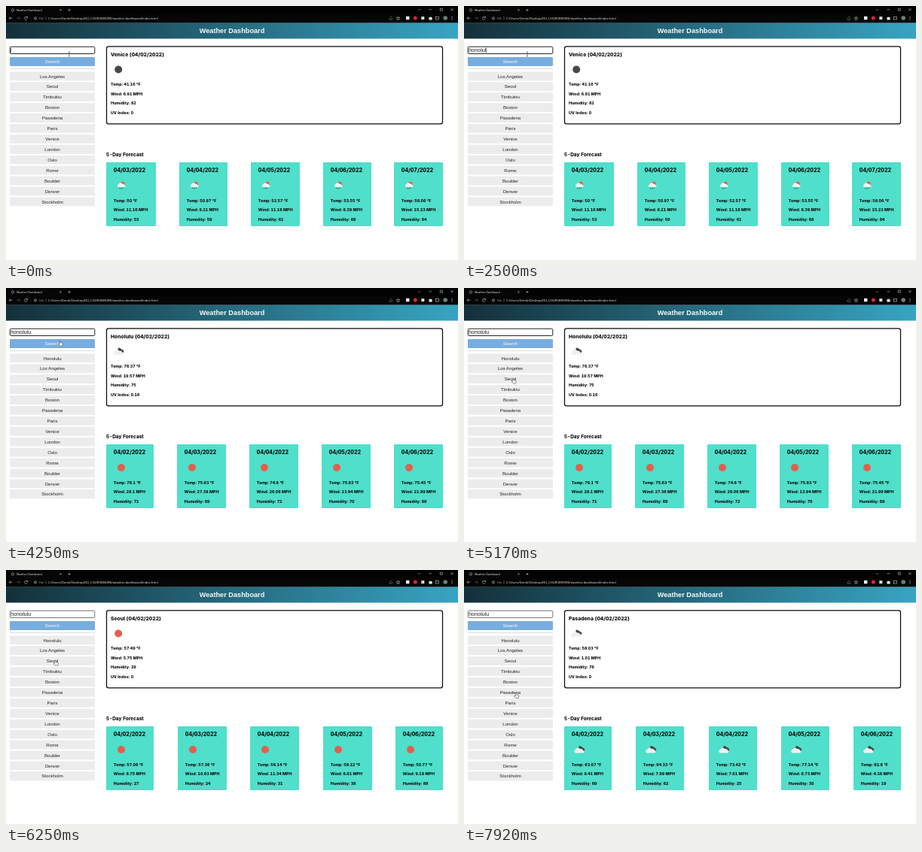
Recreate the animation shown at these times as an HTML page. Size 600x338 px, loop 8 s.

```html
<!DOCTYPE html>
<html lang="en">
<head>
<meta charset="utf-8">
<title>Weather Dashboard</title>
<style>
  html, body { margin: 0; width: 100%; height: 100%; overflow: hidden; background: #fff; }
  svg { display: block; width: 100%; height: 100%; }
  text { white-space: pre; }
  .arial { font-family: "Liberation Sans", Arial, sans-serif; }
  .bold { font-family: Inter, sans-serif; font-weight: 800; font-feature-settings: "tnum"; }
  .chrome { font-family: "Open Sans", sans-serif; }
</style>
</head>
<body>
<svg id="stage" viewBox="0 0 600 338">
  <defs>
    <linearGradient id="banner">
      <stop offset="0" stop-color="#14303a"/>
      <stop offset="1" stop-color="#38a4c2"/>
    </linearGradient>
    <g id="sun"><circle r="5" fill="#e35f4c"/></g>
    <g id="moon"><circle r="5" fill="#484848"/></g>
    <g id="clouds">
      <path d="M1 -2.9L5.3 -.2" stroke="#454545" stroke-width="3.8" stroke-linecap="round"/>
      <path d="M-5 4.4a2.3 2.3 0 0 1-.1-4.5a3.8 3.8 0 0 1 6.6-.6a2.7 2.7 0 0 1 3.7 2a1.6 1.6 0 0 1-.2 3.1z" fill="#f0f0f0"/>
    </g>
    <g id="rain">
      <circle cx="1.8" cy="-2.2" r="3" fill="#e35f4c"/>
      <path d="M-3.6 2a1.9 1.9 0 0 1 0-3.7a2.8 2.8 0 0 1 5.2-.5a2.1 2.1 0 0 1 2.7 1.6a1.3 1.3 0 0 1 0 2.6z" fill="#f2f2f2"/>
      <path d="M-2 2.6l-.8 1.5M.4 2.6l-.9 2.2M2.6 2.6l-.8 1.5" stroke="#484848" stroke-width=".8"/>
    </g>
  </defs>

  <rect width="600" height="338" fill="#fff"/>
  <g class="chrome" fill="#f2f2f2">
    <rect width="600" height="22.5" fill="#020202"/>
    <path d="M2 11V3a2 2 0 0 1 2-2H76a2 2 0 0 1 2 2v8H600v11.5H0V11z" fill="#060606"/>
    <text x="14" y="6.8" font-size="3.6">Weather Dashboard</text>
    <text x="44" y="17.6" font-size="3.9" fill="#aaa">File</text>
    <text x="56" y="17.6" font-size="4.15">C:/Users/Derek/Desktop/DU_COURSEWORK/weather-dashboard/index.html</text>
    <g fill="none" stroke="#ccc" stroke-width=".6">
      <circle cx="9" cy="5.5" r="1.7"/>
      <path d="M71.2 4.2l2.4 2.4m0-2.4l-2.4 2.4M82.3 5.4h3.4M84 3.7v3.4"/>
      <path d="M8.3 16.2H4.2m1.8-1.8l-1.8 1.8l1.8 1.8"/>
      <path d="M14.3 16.2h4.1m-1.8-1.8l1.8 1.8l-1.8 1.8" stroke="#666"/>
      <path d="M28.2 15.2a2 2 0 1 0 .1 1.8M28.5 13.8v1.7h-1.7"/>
      <circle cx="39" cy="16.3" r="1.6"/>
      <path d="M39 16v1.2M53 14.3v4" stroke="#888"/>
      <path d="M509 16v2h3.5v-2M510 16.2c0-1.5 1-2 2.5-2" stroke="#888"/>
      <path d="M520.5 14l.7 1.5 1.6.2-1.2 1.1.3 1.6-1.4-.8-1.4.8.3-1.6-1.2-1.1 1.6-.2z"/>
      <path d="M547.3 4.3l1.3 1.3l1.3-1.3M561.6 4.8h3.4M576.3 3.2h3v3h-3zM590.6 3.3l3 3m0-3l-3 3"/>
      <rect x="570.6" y="14.2" width="3.8" height="3.8"/>
    </g>
    <rect x="531" y="13.8" width="4.4" height="4.4"/>
    <circle cx="543.3" cy="16" r="2.5" fill="#e2203f"/>
    <rect x="551.3" y="14.1" width="4" height="4" fill="#ddd"/>
    <path d="M561.5 15h1.2a.9.9 0 0 1 1.7 0h1v1.1a.8.8 0 0 1 0 1.5v.9h-3.9z"/>
    <circle cx="583.2" cy="16" r="2.8" fill="#6f8178"/>
    <path d="M592 14v.9m0 .8v.9m0 .8v.9" stroke="#ddd" stroke-width=".9"/>
  </g>
  <rect y="22.5" width="600" height="21" fill="url(#banner)"/>
  <text class="arial" x="300" y="36.3" font-size="9.2" font-weight="700" text-anchor="middle" fill="#f6fafb">Weather Dashboard</text>

  <rect id="field" x="5.3" y="54.2" width="112.5" height="9.3" rx="1.4" fill="#fff"/>
  <text id="query" class="arial" x="6.2" y="61.2" font-size="7.2" fill="#222"></text>
  <rect id="caret" y="55.6" width=".6" height="6.8" fill="#111"/>
  <rect x="5" y="68" width="113" height="12" rx="1.2" fill="#78addf"/>
  <text class="arial" x="61.5" y="76.1" font-size="6.1" text-anchor="middle" fill="#fff">Search</text>
  <path d="M5 83.6H118" stroke="#c4c4c4" stroke-width=".6"/>

  <rect x="133.5" y="53.9" width="446" height="102.9" rx="2.6" fill="#fff" stroke="#0a0a0a" stroke-width="1.25"/>
  <text class="bold" x="133" y="200.1" font-size="6.4" fill="#111">5-Day Forecast</text>
  <g id="lists"></g>
  <g id="views"></g>

  <g id="ibeam" fill="none" stroke="#333" stroke-width=".6">
    <path d="M-1.2 -2.8H1.2M0 -2.8V2.8M-1.2 2.8H1.2"/>
  </g>
  <g id="hand">
    <path d="M-.6 .6a.6.6 0 0 1 1.2 0V2.7l2.4.5q.9.3.7 1.3L3.2 7.2H-.2L-2.2 4.7q-.2-.8.6-.7l1 .6z"
      fill="#fff" stroke="#222" stroke-width=".5" stroke-linejoin="round"/>
  </g>
</svg>
<script>
const LOOP = 8000, BLINK = 500, BLUR_AT = 5580, LIST_AT = 3670;
const $ = id => document.getElementById(id);

function add(parent, tag, attrs, content = '') {
  const node = document.createElementNS('http://www.w3.org/2000/svg', tag);
  for (const key in attrs) node.setAttribute(key, attrs[key]);
  node.textContent = content;
  parent.appendChild(node);
  return node;
}

const label = (parent, x, y, size, content) =>
  add(parent, 'text', { class: 'bold', x, y, 'font-size': size, fill: '#111' }, content);

// now: temp, wind, humidity, UV; days: temp, wind, humidity, card width
const reports = [
  { at: 0, city: 'Venice', now: [41.16, 6.91, 82, 0], icon: 'moon', firstDay: 3, dayIcon: 'rain',
    days: [[50, 11.16, 53, 65.5], [50.97, 8.21, 59, 64], [52.57, 11.18, 61, 65], [53.55, 8.39, 68, 63.5], [58.06, 15.23, 64, 65]] },
  { at: LIST_AT, city: 'Honolulu', now: [76.37, 19.57, 75, 0.16], icon: 'clouds', firstDay: 2, dayIcon: 'sun',
    days: [[76.1, 28.1, 71, 63], [75.63, 27.38, 69, 65], [74.8, 26.06, 72, 65], [75.83, 13.94, 70, 64.5], [75.45, 21.99, 69, 65]] },
  { at: 6250, city: 'Seoul', now: [57.49, 5.75, 29, 0], icon: 'sun', firstDay: 2, dayIcon: 'sun',
    days: [[57.06, 8.75, 27, 63], [57.36, 10.83, 24, 64.5], [56.14, 11.34, 31, 64.5], [59.22, 8.01, 38, 64.5], [50.77, 9.19, 88, 63]] },
  { at: 7920, city: 'Pasadena', now: [58.03, 1.01, 78, 0], icon: 'clouds', firstDay: 2, dayIcon: 'clouds',
    days: [[63.07, 8.41, 69, 63], [64.33, 7.99, 62, 64], [73.42, 7.61, 25, 64], [77.14, 6.73, 30, 64], [82.8, 4.38, 19, 63]] }
];

function addStats(parent, x, y, [temp, wind, humidity, uv]) {
  const lines = [`Temp: ${temp} °F`, `Wind: ${wind} MPH`, `Humidity: ${humidity}`];
  if (uv !== undefined) lines.push(`UV Index: ${uv}`);
  lines.forEach((line, i) => label(parent, x, y + i * 12.45, 5.3, line));
}

function addIcon(parent, name, x, y) {
  add(parent, 'use', { href: '#' + name, x, y });
}

function buildReport(report) {
  const view = add($('views'), 'g', {});
  label(view, 139, 66.5, 6.8, `${report.city} (04/02/2022)`);
  addIcon(view, report.icon, 149.2, 84.5);
  addStats(view, 139, 106.4, report.now);

  const total = report.days.reduce((sum, day) => sum + day[3], 0);
  const gap = (447 - total) / 4;
  let left = 133;
  report.days.forEach(([temp, wind, humidity, width], i) => {
    const x = Math.round(left);
    add(view, 'rect', { x, y: 208, width: Math.round(width), height: 85, rx: 1, fill: '#4fdfca' });
    label(view, x + 9.8, 220.9, 7.1, `04/0${report.firstDay + i}/2022`);
    addIcon(view, report.dayIcon, x + 20, 239);
    addStats(view, x + 9.8, 260.9, [temp, wind, humidity]);
    left += width + gap;
  });
  return view;
}

function buildList(cities) {
  const list = add($('lists'), 'g', {});
  cities.forEach((city, i) => {
    const y = 87.4 + i * 13.92;
    add(list, 'rect', { x: 5, y, width: 113, height: 11.8, rx: 1.2, fill: '#ececec' });
    add(list, 'text', { class: 'arial', x: 61.5, y: y + 8.1, 'font-size': 6.1, 'text-anchor': 'middle', fill: '#222' }, city);
  });
  return list;
}

const cities = ['Los Angeles', 'Seoul', 'Timbuktu', 'Boston', 'Pasadena', 'Paris', 'Venice',
  'London', 'Oslo', 'Rome', 'Boulder', 'Denver', 'Stockholm'];
const shortList = buildList(cities);
const longList = buildList(['Honolulu', ...cities]);
const views = reports.map(buildReport);

const word = 'honolulu';
const keyTimes = [1500, 1670, 2000, 2080, 2170, 2330, 2500, 2670];
const path = [[4090, 84, 64], [4250, 71.7, 70], [4420, 71.7, 70], [4920, 65.5, 119.8],
  [6250, 65.5, 119.8], [6830, 69, 163.3]];

function pointerAt(t) {
  const next = path.findIndex(p => p[0] > t);
  if (next === 0) return path[0].slice(1);
  if (next < 0) return path[path.length - 1].slice(1);
  const [t0, x0, y0] = path[next - 1], [t1, x1, y1] = path[next];
  const u = (t - t0) / (t1 - t0), k = u * u * (3 - 2 * u);
  return [x0 + (x1 - x0) * k, y0 + (y1 - y0) * k];
}

const show = (node, on) => node.setAttribute('visibility', on ? 'visible' : 'hidden');

function render(t) {
  const current = reports.filter(r => r.at <= t).length - 1;
  views.forEach((view, i) => show(view, i === current));
  show(shortList, t < LIST_AT);
  show(longList, t >= LIST_AT);

  const typed = keyTimes.filter(k => k <= t).length;
  const query = $('query');
  query.textContent = word.slice(0, typed);
  const blinkStart = typed ? keyTimes[typed - 1] : -330;
  const focused = t < BLUR_AT;
  show($('caret'), focused && Math.floor((t - blinkStart) / BLINK) % 2 === 0);
  $('caret').setAttribute('x', 6.3 + (typed ? query.getComputedTextLength() : 0));
  $('field').setAttribute('stroke', focused ? '#222' : '#555');
  $('field').setAttribute('stroke-width', focused ? 1 : 0.8);

  const [x, y] = pointerAt(t);
  const overField = y < 66;
  show($('ibeam'), overField);
  show($('hand'), !overField);
  $(overField ? 'ibeam' : 'hand').setAttribute('transform', `translate(${x} ${y})`);
}

const start = performance.now();
function tick() {
  render((performance.now() - start) % LOOP);
  requestAnimationFrame(tick);
}
tick();
</script>
</body>
</html>
```
